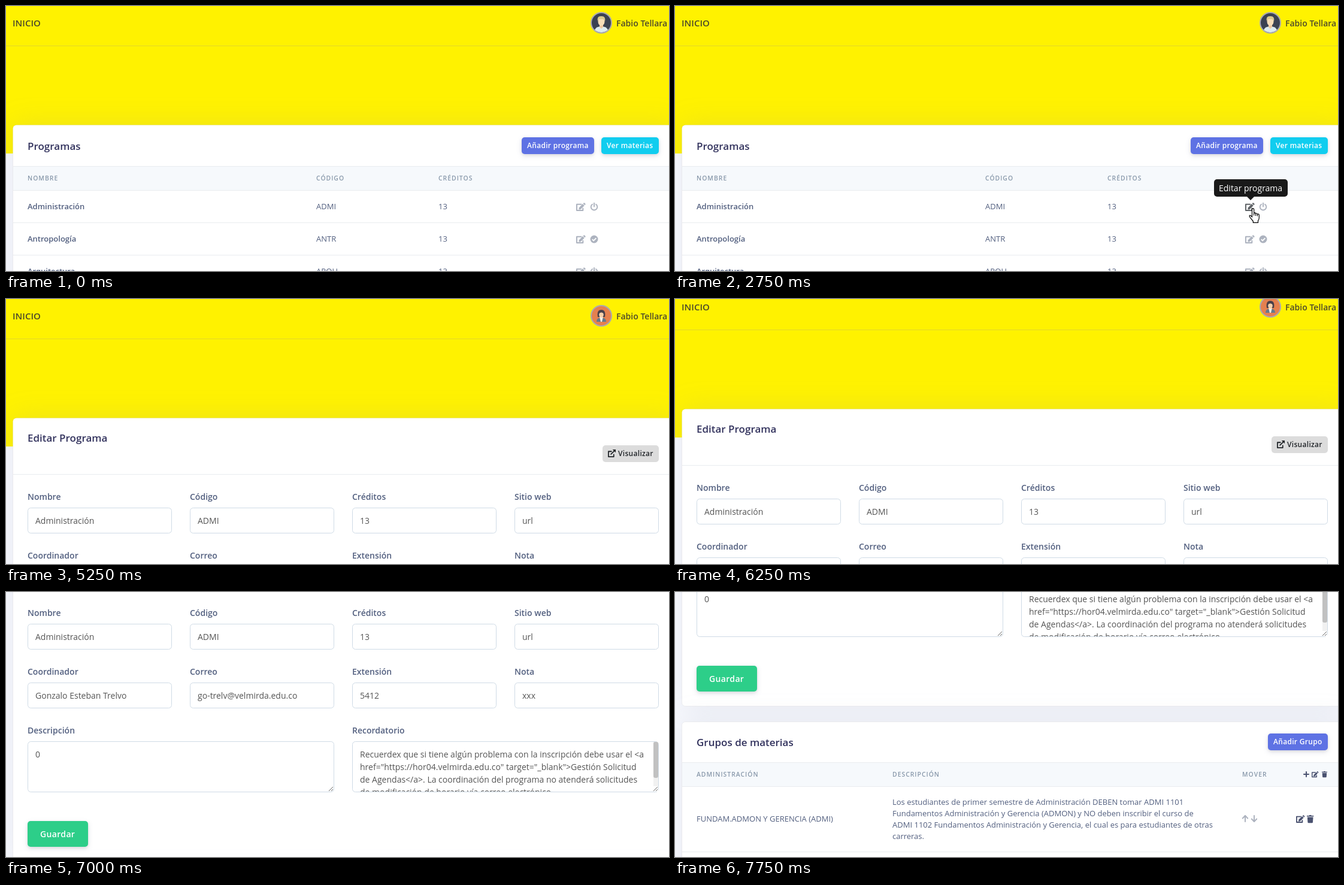
These frames come from a looping animation (1107x442 px, 8 s). An HTML page:

```html
<!DOCTYPE html>
<html lang="es">
<head>
<meta charset="utf-8">
<style>
html, body { margin: 0; width: 100%; height: 100%; overflow: hidden; background: #f8f9fe; }
svg { display: block; width: 1107px; height: 442px; font: 14px "Open Sans", sans-serif; }
text { white-space: pre; }
.nav { font-size: 15px; font-weight: 600; fill: #4d4a2a; }
.user { font-weight: 600; fill: #4d4a2a; }
.title { font-size: 17px; font-weight: 600; fill: #32325d; }
.label { font-weight: 600; fill: #525f7f; }
.value { fill: #555; }
.cell { font-size: 13px; fill: #525f7f; }
.name { font-size: 13px; font-weight: 600; fill: #525f7f; }
.head { font-size: 10.4px; font-weight: 600; letter-spacing: 1px; fill: #8898aa; }
.btn { font-size: 12px; font-weight: 600; letter-spacing: .025em; fill: #fff; }
.big { font-size: 14px; }
.dark { fill: #212529; }
.raised { filter: drop-shadow(0 3px 4px rgba(50,50,93,.14)) drop-shadow(0 1px 2px rgba(0,0,0,.08)); }
.card { fill: #fff; stroke: #0000000d; filter: drop-shadow(0 0 24px rgba(136,152,170,.16)); }
.field { fill: #fff; stroke: #cfdbe6; }
</style>
</head>
<body>
<svg id="stage" viewBox="0 0 1107 442"></svg>
<script>
const stage = document.getElementById('stage');
const esc = s => s.replace(/</g, '&lt;');
const text = (cls, x, y, s) => `<text class="${cls}" x="${x}" y="${y}">${esc(s)}</text>`;
const rect = (x, y, w, h, fill, rx = 0, more = '') =>
  `<rect x="${x}" y="${y}" width="${w}" height="${h}" rx="${rx}" fill="${fill}" ${more}/>`;
const rule = (y, color = '#e9ecef') => rect(12, y, 1095, 1, color);
const at = (x, y, body, more = '') => `<g transform="translate(${x} ${y})" ${more}>${body}</g>`;
const button = (x, y, w, h, fill, tx, ty, s, cls = '') =>
  rect(x, y, w, h, fill, 5, 'class="raised"') + text('btn ' + cls, tx, ty, s);
const card = (y, h) => `<rect class="card" x="11.5" y="${y}.5" width="1110" height="${h}" rx="6"/>`;
const field = (x, y, w, h) => `<rect class="field" x="${x}.5" y="${y}.5" width="${w - 1}" height="${h - 1}" rx="5"/>`;

// Icons, each drawn in a box of about 16 by 14
const stroke = (d, w = 2) => `<path d="${d}" fill="none" stroke="currentColor" stroke-width="${w}" stroke-linecap="round" stroke-linejoin="round"/>`;
const solid = d => `<path d="${d}" fill="currentColor"/>`;
const icon = (x, y, color, body, scale = 1, id = '') =>
  `<g ${id && `id="${id}"`} transform="translate(${x} ${y}) scale(${scale})" color="${color}">${body}</g>`;
const edit = stroke('M8.4 2.8H1V13H11.3V9.6') +
  solid('M4.6 8.4 10.9 2.1 13.7 4.9 7.4 11.2 4.3 11.6zM11.6 1.4 12.5.5Q13.3-.2 14 .5L15.3 1.8Q16 2.5 15.3 3.3L14.4 4.2z');
const power = stroke('M3.6 2.7A5.3 5.3 0 1 0 9.4 2.7M6.5.8V6.6', 1.9);
const check = '<circle cx="6.5" cy="7" r="6.5" fill="currentColor"/>' +
  '<path d="M3.3 7.2 5.6 9.5 9.9 5.1" fill="none" stroke="#fff" stroke-width="1.8"/>';
const trash = solid('M0 1H3.8L4.5 0H7.5L8.2 1H12V2.7H0zM.9 3.6H11.1L10.5 12.5Q10.4 14 9 14H3Q1.6 14 1.5 12.5z');
const external = stroke('M6.3 3.5H1V13H10.5V9M5.5 8.5 12 2', 1.9) + solid('M8.3 0H14V5.7z');
const plus = stroke('M5 1V9M1 5H9');
const up = stroke('M5 11V1M.8 5.5 5 1 9.2 5.5');
const down = stroke('M5 1V11M.8 6.5 5 11 9.2 6.5');

const avatar = (bg, body) => `<circle cx="994" cy="28" r="17" fill="${bg}" stroke="#aaa9b0" stroke-width="2"/>` + body;
const man = avatar('#3b4252',
  '<path d="M983 40Q985 34 994 34T1005 40Q994 48 983 40z" fill="#dcebef"/><path d="M991 30H997V35L994 38 991 35z" fill="#edc79f"/>' +
  '<ellipse cx="994" cy="26" rx="5.5" ry="7" fill="#f6ddb8"/><path d="M988 26Q986 17 993 17 1002 16 1000 26 998 21 994 22 989 21 988 26z" fill="#d8c98e"/>');
const woman = avatar('#e5804f',
  '<path d="M988 30Q986 18 994 18T1000 30z" fill="#49404a"/><path d="M986 38Q986 31 994 31T1002 38z" fill="#65798b"/>' +
  '<path d="M991 30H997L995 38H993z" fill="#f4eee4"/><ellipse cx="994" cy="26" rx="3.8" ry="5" fill="#f5d0aa"/>' +
  '<path d="M989.5 25Q990 20 994 20T998.5 25Q996 22 994 22.5 992 22 989.5 25z" fill="#49404a"/>');

const top_ = face => rect(0, 0, 1107, 246, '#fff200') + rect(0, 66, 1107, 1, '#e2d62b') +
  text('nav', 11, 34, 'INICIO') + face + text('user', 1019, 34, 'Fabio Tellara');

const gray = '#adb3bf', navy = '#4a5270';
const programs = [['Administración', 'ADMI', power], ['Antropología', 'ANTR', check], ['Arquitectura', 'ARQU', power]];
const listPage = top_(man) + card(198, 300) + text('title', 36, 240, 'Programas') +
  button(861, 219, 121, 28, '#5e72e4', 870, 237, 'Añadir programa') +
  button(994, 219, 96, 28, '#11cdef', 1003, 237, 'Ver materias') +
  rect(12, 267, 1095, 41, '#f6f9fc') + rule(267) + rule(307) +
  text('head', 36, 291, 'NOMBRE') + text('head', 518, 291, 'CÓDIGO') + text('head', 722, 291, 'CRÉDITOS') +
  programs.map(([name, code, state], i) => {
    const y = 339 + 54 * i;
    return text('name', 36, y, name) + text('cell', 518, y, code) + text('cell', 722, y, '13') +
      icon(952, y - 11, gray, edit, 1, 'edit' + i) + icon(975.5, y - 11, gray, state) + rule(y + 22);
  }).join('') +
  '<g id="tip">' + rect(900, 289, 123, 29, '#191919', 5) + '<path d="M955 318H967L961 324z" fill="#191919"/>' +
  '<text x="908" y="308.5" fill="#fff">Editar programa</text></g>';

const inputs = [
  ['Nombre', 'Administración'], ['Código', 'ADMI'], ['Créditos', '13'], ['Sitio web', 'url'],
  ['Coordinador', 'Gonzalo Esteban Trelvo'], ['Correo', 'go-trelv@velmirda.edu.co'], ['Extensión', '5412'], ['Nota', 'xxx']
];
const reminder = [
  'Recuerdex que si tiene algún problema con la inscripción debe usar el <a',
  'href="https://hor04.velmirda.edu.co" target="_blank">Gestión Solicitud',
  'de Agendas</a>. La coordinación del programa no atenderá solicitudes',
  'de modificación de horario vía correo electrónico.'
];
const notes = [
  'Los estudiantes de primer semestre de Administración DEBEN tomar ADMI 1101',
  'Fundamentos Administración y Gerencia (ADMON) y NO deben inscribir el curso de',
  'ADMI 1102 Fundamentos Administración y Gerencia, el cual es para estudiantes de otras',
  'carreras.'
];
const grip = x => `<path d="M${x} 627l7-7m-3 7l3-3" stroke="#666" fill="none"/>`;
const editPage = top_(woman) + card(198, 546) + text('title', 36, 238, 'Editar Programa') +
  '<g id="view">' + rect(996, 244, 94, 28, '#dcdcdc', 5) + icon(1005, 251, '#212529', external, .93) +
  text('btn dark', 1022, 262, 'Visualizar') + '</g>' + rule(292) +
  inputs.map(([label, value], i) => {
    const x = 36 + 271 * (i % 4), y = 335 + 98 * (i >> 2);
    return text('label', x, y, label) + field(x, y + 13, 241, 43) + text('value', x + 13, y + 40, value);
  }).join('') +
  text('label', 36, 531, 'Descripción') + field(36, 544, 512, 85) + text('value', 49, 571, '0') + grip(539) +
  text('label', 578, 531, 'Recordatorio') + field(578, 544, 512, 85) +
  '<clipPath id="area"><rect x="579" y="545" width="510" height="83"/></clipPath><g clip-path="url(#area)">' +
  reminder.map((s, i) => text('value', 591, 571 + 21 * i, s)).join('') +
  rect(1081, 545, 8, 83, '#f1f1f1') + rect(1081, 545, 8, 60, '#c1c1c1', 3) + rect(1081, 619, 8, 9, '#fff') + grip(1081) + '</g>' +
  button(36, 677, 101, 43, '#2dce89', 57, 704, 'Guardar', 'big') +
  card(770, 400) + text('title', 36, 811, 'Grupos de materias') +
  button(990, 790, 100, 28, '#5e72e4', 999, 808, 'Añadir Grupo') +
  rect(12, 838, 1095, 41, '#f6f9fc') + rule(838) + rule(878) +
  text('head', 36, 862, 'ADMINISTRACIÓN') + text('head', 363, 862, 'DESCRIPCIÓN') + text('head', 947, 862, 'MOVER') +
  icon(1049, 853, navy, plus) + icon(1063, 853, navy, edit, .73) + icon(1080, 853, navy, trash, .74) +
  text('cell', 36, 937, 'FUNDAM.ADMON Y GERENCIA (ADMI)') +
  notes.map((s, i) => text('cell', 363, 909 + 19 * i, s)).join('') +
  icon(947, 926, gray, up) + icon(962, 926, gray, down) +
  icon(1037, 926, navy, edit, .92) + icon(1055, 926, navy, trash, .95) + rule(987);

const arrow = '<path d="M.5.5V16.5L4 13.2 6.5 19.5 9 18.5 6.5 12.3H11.5z" fill="#fff" stroke="#000"/>';
const hand = '<path d="M5.5 15V2.5Q5.5.7 7.1.7T8.7 2.5V8.5Q10.3 7.3 11.7 9 13.3 8.2 14.5 10 17.3 9.2 17.3 12.5V16Q17.3 19 15.5 21V24.3H7.3V22L2.6 16.2Q.2 13 1.6 12.2 3 11.6 5.5 15z' +
  'M8.7 8.5V12.5M11.7 9V13M14.5 10V13.5" fill="#fff" stroke="#000" stroke-width="1.2" stroke-linejoin="round"/>';

stage.innerHTML = `<g id="list">${listPage}</g><g id="form">${editPage}</g>` +
  `<g id="arrow">${arrow}</g><g id="hand">${hand}</g>`;

const el = id => document.getElementById(id);
const show = (id, on) => el(id).setAttribute('opacity', +on);
const move = (id, x, y) => el(id).setAttribute('transform', `translate(${x} ${y})`);

// [start, pointer, x, y]
const pointer = [
  [0, ''], [1250, 'arrow', 705, 345], [1500, 'arrow', 766, 332], [1750, 'arrow', 885, 332], [2000, 'arrow', 932, 334],
  [2250, 'hand', 957, 344], [2500, 'hand', 958, 337], [4250, 'hand', 953, 336], [4500, 'arrow', 960, 336],
  [4750, 'hand', 1030, 250], [5000, '']
];
const scrolls = [0, 15, 75, 185, 295, 395, 490, 554];

function draw(now) {
  const t = now % 8000;
  const editing = t >= 4500;
  el('list').style.display = editing ? 'none' : '';
  el('form').style.display = editing ? '' : 'none';
  move('form', 0, -scrolls[Math.max(0, Math.floor((t - 6000) / 250))]);
  show('tip', t < 2500 ? 0 : t < 2750 ? .5 : 1);
  el('edit0').setAttribute('color', t < 2250 ? gray : '#606468');

  const hover = t < 4750 || t >= 5250 ? 0 : t < 5000 ? 1 : .3;
  el('view').style.filter = hover ? `drop-shadow(0 5px 6px rgba(50,50,93,${.18 * hover}))` : '';
  move('view', 0, hover === 1 ? -1 : 0);

  const [, kind, x, y] = pointer.filter(p => p[0] <= t).pop();
  show('arrow', kind === 'arrow');
  show('hand', kind === 'hand');
  if (kind) move(kind, x, y);
}

const start = performance.now();
(function tick() {
  draw(performance.now() - start);
  requestAnimationFrame(tick);
})();
</script>
</body>
</html>
```
